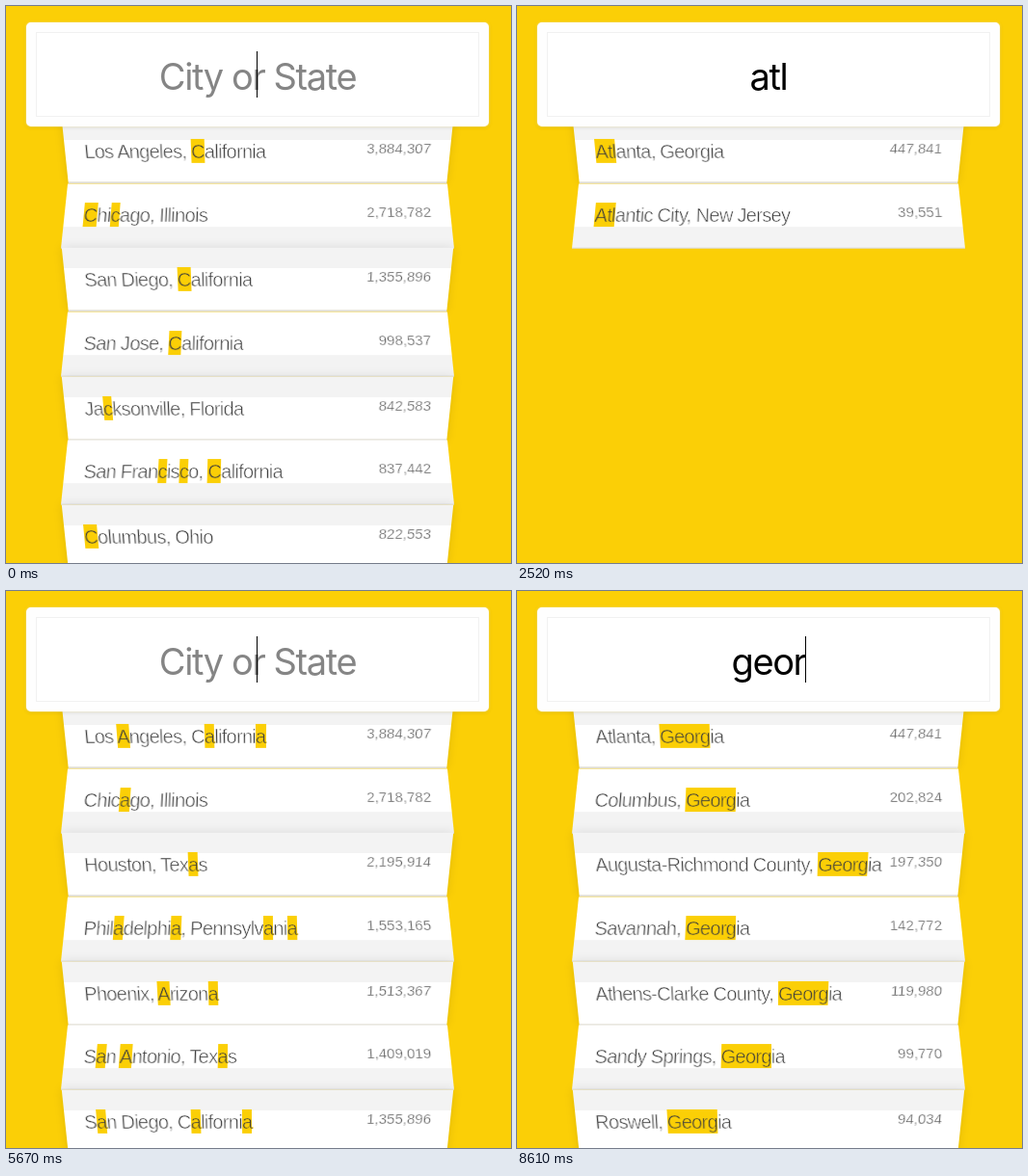
Recreate the animation shown at these times as an HTML page. Size 524x578 px, loop 8.68 s.

```html
<!DOCTYPE html>
<html lang="en">
<head>
<meta charset="utf-8">
<title>City search</title>
<style>
  :root { --yellow: #fbcf06; }
  * { box-sizing: border-box; }
  html, body {
    margin: 0; width: 100%; height: 100%; overflow: hidden;
    background: var(--yellow);
    font-family: "Liberation Sans", Arial, sans-serif;
  }
  #stage { position: relative; width: 524px; height: 578px; overflow: hidden; }

  .search {
    position: absolute; z-index: 2; left: 21px; top: 17px; width: 480px; height: 108px;
    border: 10px solid #fefefe; border-radius: 5px; background: #fff;
    box-shadow: 0 0 2px #fff0b4, 0 1px 4px rgba(0, 0, 0, .12), inset 0 0 0 1px #f1f1f1;
    text-align: center; font: 38px/48px Inter, sans-serif; letter-spacing: -1.4px;
    font-optical-sizing: none;
  }
  .query { position: relative; display: inline-block; top: 22px; height: 48px; white-space: pre; color: #000; }
  .caret { position: absolute; left: 100%; top: -2px; width: 1px; height: 48px; background: #000; }
  .empty .query { color: #858585; }
  .empty .caret { left: calc(50% - 1px); }

  ul {
    position: absolute; left: 61px; top: 115px; width: 400px;
    margin: 0; padding: 0; list-style: none;
  }
  li {
    display: flex; justify-content: space-between; align-items: flex-start;
    height: 66.65px; padding: 20px; white-space: pre;
    border-bottom: 1px solid #dcdcdc;
    font-size: 20px; line-height: 26px; letter-spacing: -.7px; color: #3c3c3c;
    -webkit-text-stroke: .6px #fff;
  }
  li:nth-child(odd) {
    transform: perspective(100px) rotateX(-3deg) translateY(3px);
    background: linear-gradient(#f3f3f3 32%, #fff 33%);
    border-bottom: 2px solid #e0ddd2;
    box-shadow: 0 0 10px rgba(0, 0, 0, .1);
  }
  li:nth-child(even) {
    transform: perspective(100px) rotateX(3deg) translateY(2px) scale(1.001);
    background: linear-gradient(#fff 68%, #f3f3f3 69%);
  }
  mark {
    padding: 2px 0 1px; color: inherit; background: var(--yellow);
    -webkit-text-stroke-color: var(--yellow);
  }
  .count {
    font-size: 15px; line-height: 19px; letter-spacing: 0; color: #5c5c5c;
    -webkit-text-stroke-width: .35px;
  }
</style>
</head>
<body>
<div id="stage">
  <div class="search"><span class="query"><span class="text"></span><i class="caret"></i></span></div>
  <ul></ul>
</div>
<script>
const LOOP = 8680;

const results = {
  '': 'Filter For A City|Or A State',
  c: `Los Angeles, California:3,884,307|Chicago, Illinois:2,718,782|San Diego, California:1,355,896|
San Jose, California:998,537|Jacksonville, Florida:842,583|San Francisco, California:837,442|Columbus, Ohio:822,553`,
  a: `Los Angeles, California:3,884,307|Chicago, Illinois:2,718,782|Houston, Texas:2,195,914|
Philadelphia, Pennsylvania:1,553,165|Phoenix, Arizona:1,513,367|San Antonio, Texas:1,409,019|San Diego, California:1,355,896`,
  at: `Seattle, Washington:652,405|Atlanta, Georgia:447,841|Cincinnati, Ohio:297,517|
Baton Rouge, Louisiana:229,426|Chattanooga, Tennessee:173,366|Paterson, New Jersey:145,948|Athens-Clarke County, Georgia:119,980`,
  atl: 'Atlanta, Georgia:447,841|Atlantic City, New Jersey:39,551',
  g: `Los Angeles, California:3,884,307|Chicago, Illinois:2,718,782|San Diego, California:1,355,896|
Detroit, Michigan:688,701|Seattle, Washington:652,405|Washington, District of Columbia:646,449|Portland, Oregon:609,456`,
  ge: `Los Angeles, California:3,884,307|Atlanta, Georgia:447,841|Anchorage, Alaska:300,950|
Baton Rouge, Louisiana:229,426|Columbus, Georgia:202,824|Augusta-Richmond County, Georgia:197,350|Bridgeport, Connecticut:147,216`,
  geo: `Atlanta, Georgia:447,841|Columbus, Georgia:202,824|Augusta-Richmond County, Georgia:197,350|
Savannah, Georgia:142,772|Athens-Clarke County, Georgia:119,980|Sandy Springs, Georgia:99,770|Roswell, Georgia:94,034`
};
results.atla = results.atl;
results.geor = results.georg = results.geo;

// time, typed text, filter shown in the list, caret visible
const steps = [
  [0, '', 'c', 1], [140, '', '', 1], [700, '', '', 0], [1190, '', '', 1],
  [1540, 'a', '', 0], [1680, 'a', 'a', 0],
  [2030, 'at', 'a', 0], [2170, 'at', 'at', 0],
  [2380, 'atl', 'at', 0], [2520, 'atl', 'atl', 0],
  [3010, 'atla', 'atl', 0], [3150, 'atla', 'atla', 0], [3640, 'atla', 'atla', 1],
  [3850, 'atl', 'atla', 1], [3990, 'atl', 'atl', 1], [4200, 'atl', 'atl', 0],
  [4340, 'at', 'atl', 1], [4480, 'at', 'at', 1],
  [4900, 'a', 'at', 1], [5040, 'a', 'a', 1],
  [5600, '', 'a', 1], [5740, '', '', 1], [6160, '', '', 0],
  [6650, 'g', '', 1], [6790, 'g', 'g', 1],
  [6930, 'ge', 'g', 1], [7000, 'ge', 'ge', 1],
  [7140, 'geo', 'ge', 1], [7280, 'geo', 'geo', 1],
  [7490, 'geor', 'geo', 1], [7630, 'geor', 'geor', 1],
  [7840, 'georg', 'geor', 0], [8050, 'georg', 'georg', 0], [8400, 'georg', 'georg', 1],
  [8540, 'geor', 'georg', 1]
];

const $ = selector => document.querySelector(selector);
const search = $('.search'), text = $('.text'), caret = $('.caret'), list = $('ul');

function rowsFor(filter) {
  return results[filter].split('|').map(row => {
    const [name, count = ''] = row.trim().split(':');
    const label = filter ? name.replace(new RegExp(filter, 'gi'), '<mark>$&</mark>') : name;
    return `<li><span>${label}</span><span class="count">${count}</span></li>`;
  }).join('');
}

let shownStep, shownFilter;

function draw() {
  const time = performance.now() % LOOP;
  const step = steps.findLast(([start]) => start <= time);
  if (step !== shownStep) {
    const [, typed, filter, caretOn] = shownStep = step;
    search.classList.toggle('empty', !typed);
    text.textContent = typed || 'City or State';
    caret.style.visibility = caretOn ? 'visible' : 'hidden';
    if (filter !== shownFilter) list.innerHTML = rowsFor(shownFilter = filter);
  }
  requestAnimationFrame(draw);
}
draw();
</script>
</body>
</html>
```
